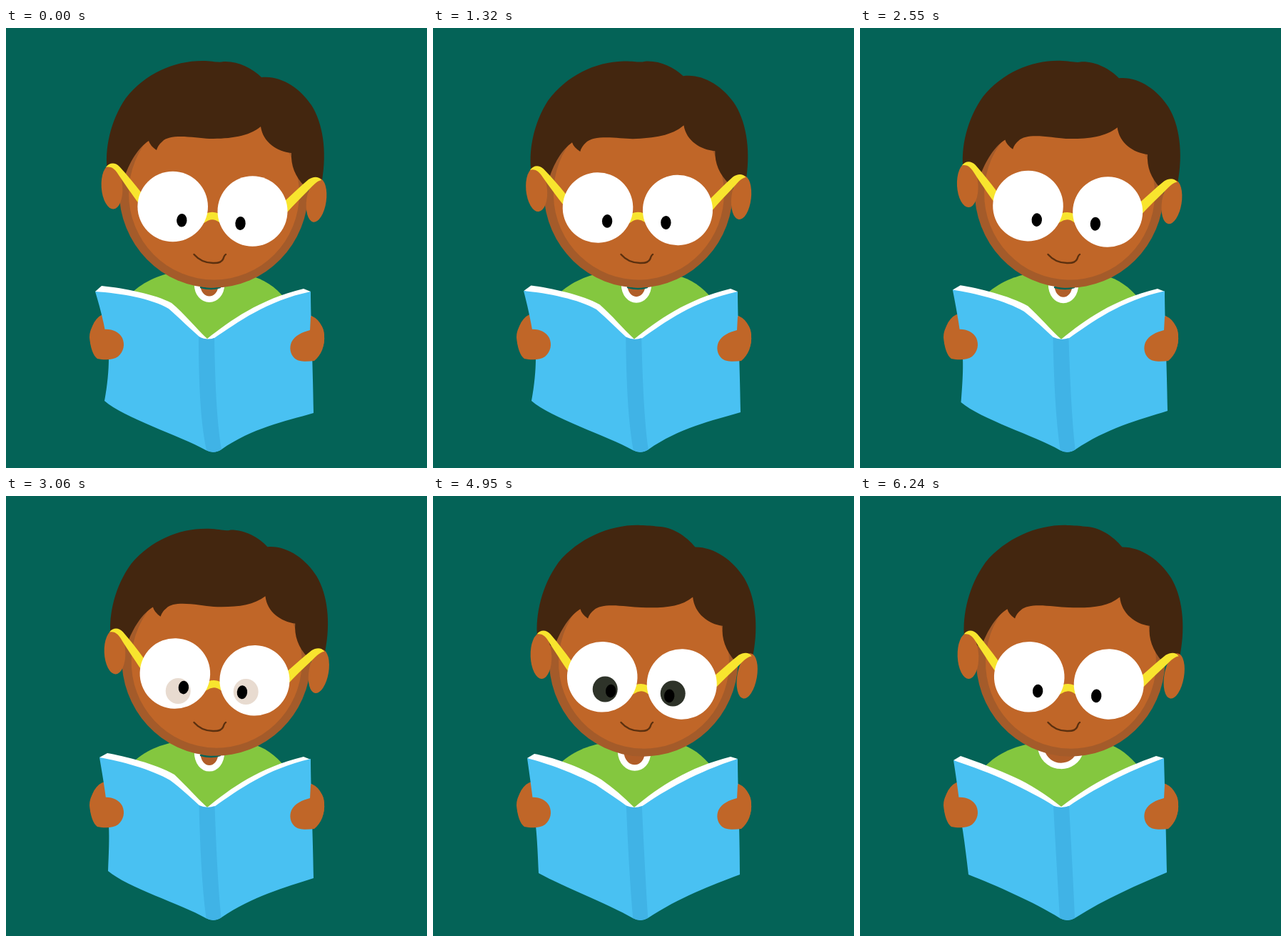
Recreate the animation shown at these times as an HTML page with a canvas. Size 590 px wide and 616 px high, loop 6.72 s.

```html
<!DOCTYPE html>
<html lang="en">
<head>
<meta charset="utf-8">
<title>Boy reading</title>
<style>
  html, body { margin: 0; width: 100%; height: 100%; overflow: hidden; background: #046357; }
  canvas { display: block; }
</style>
</head>
<body>
<canvas id="stage" width="590" height="616"></canvas>
<script>
const ctx = document.getElementById('stage').getContext('2d');
const LOOP = 6720, END = 6240, STEP = 30;
const GROUND = '#046357', SKIN = '#c06628', SHADE = '#a45b2a', HAIR = '#43260f',
  YELLOW = '#f8e52e', WHITE = '#fff', GREEN = '#84c73f', BLUE = '#49c1f2', SPINE = '#40b3e6';

// Each track is a list of [time, string]; the numbers in the strings are blended.
const tracks = {
  pages: [
    [0, 'M125 369 L134 361 C165 364 210 373 232 385 C250 400 266 420 282 435 C315 409 355 380 417 365 L427 369 L282 440 Z'],
    [3060, 'M131 366 L142 360 C165 364 210 375 236 390 C251 404 267 422 282 436 C315 409 355 380 417 365 L427 369 L282 440 Z'],
    [4950, 'M132 367 L142 361 C165 365 205 378 236 397 C252 408 267 421 282 436 C318 406 358 380 417 365 L427 368 L282 440 Z'],
    [END, 'M131 370 L141 364 C165 372 195 384 215 393 C238 403 262 419 282 435 C325 402 365 382 415 364 L426 367 L282 440 Z']
  ],
  cover: [
    [0, 'M125 369 C160 371 205 379 228 393 C243 406 259 422 273 434 Q282 438 292 434 C325 412 365 382 427 369 C427 410 430 465 431 539 C390 551 345 560 302 590 Q291 597 280 591 C245 571 165 546 138 522 C142 500 144 480 144 462 C142 430 133 395 125 369 Z'],
    [1320, 'M127 368 C160 371 205 380 229 394 C244 407 259 422 273 435 Q282 439 292 435 C325 412 365 382 427 369 C427 410 430 465 431 538 C390 550 345 560 302 590 Q291 597 280 591 C245 571 165 546 138 522 C142 500 144 480 144 462 C142 430 134 395 127 368 Z'],
    [3060, 'M131 366 C160 371 205 383 230 398 C245 409 260 423 273 435 Q282 439 292 435 C325 412 365 382 427 368 C427 410 430 465 431 535 C390 548 345 561 302 590 Q291 597 280 591 C245 571 170 548 143 525 C144 500 145 480 144 462 C142 430 136 395 131 366 Z'],
    [4950, 'M132 367 C160 374 200 389 228 404 C243 414 259 425 273 435 Q282 439 292 435 C325 412 370 386 427 368 C427 410 430 465 430 530 C390 545 345 562 301 591 Q291 597 280 591 C245 571 185 548 148 528 C147 505 146 480 144 462 C141 430 136 395 132 367 Z'],
    [END, 'M131 370 C158 379 185 389 206 399 C232 411 255 423 272 434 Q282 438 293 434 C325 412 375 385 426 367 C427 410 429 465 430 527 C390 544 345 563 301 591 Q291 597 280 591 C245 569 190 545 152 530 C149 505 146 480 143 462 C140 430 135 395 131 370 Z']
  ],
  spine: [
    [0, 'M270 432 Q282 438 292 434 C293 490 295 550 302 590 Q291 597 281 591 C272 550 270 490 270 432 Z'],
    [END, 'M271 434 Q282 438 293 434 C296 490 299 540 301 591 Q291 597 280 591 C277 540 274 490 271 434 Z']
  ],
  shirt: [
    [0, 'M170 377 C190 355 215 346 235 342 L342 347 C360 351 378 362 391 379 L282 440 Z'],
    [END, 'M170 384 C190 361 215 351 238 347 L346 347 C362 351 378 363 392 381 L282 440 Z']
  ],
  collar: [
    [0, 'M268 358 C268 387 302 387 302 358'],
    [3060, 'M268 358 C268 389 302 389 302 358'],
    [4200, 'M268 358 C268 389 302 389 302 358'],
    [4950, 'M263 358 C265 388 301 388 301 358'],
    [END, 'M254 356 C262 385 301 385 309 357']
  ],
  // Keyed by the nod, from 0 to 1.
  hair: [
    [0, 'M142 200 C138 170 146 130 168 98 C195 64 235 46 275 46 C290 46 297 49 305 47 C325 46 345 56 358 69 C385 66 412 84 428 108 C444 133 450 172 443 213 L419 222 C405 208 399 192 400 175 C380 173 360 160 357 138 C340 152 315 155 285 155 C265 154 230 147 219 159 Q213 164 211 171 Q202 165 200 158 C186 167 173 187 165 212 Z'],
    [1, 'M141 203 C137 170 145 130 167 97 C195 61 240 41 280 41 C290 41 297 41 305 42 C325 42 345 54 358 69 C385 68 412 86 428 110 C444 135 451 174 444 218 L420 228 C405 212 399 196 400 178 C380 176 360 162 357 139 C340 154 315 156 285 156 C265 156 230 150 219 162 Q213 167 211 174 Q202 168 200 161 C186 170 173 191 165 216 Z']
  ],
  iris: [
    [2880, 'rgb(255,255,255)'], [3060, 'rgb(232,219,208)'], [3900, 'rgb(68,68,68)'],
    [4950, 'rgb(46,51,41)'], [5300, 'rgb(46,51,41)'], [6200, 'rgb(255,255,255)']
  ]
};

const clamp = x => Math.min(1, Math.max(0, x));
const ramp = (t, from, to) => clamp((t - from) / (to - from));
const ease = (t, from, to) => (1 - Math.cos(Math.PI * ramp(t, from, to))) / 2;

function blend(track, t) {
  let i = 0;
  while (i < track.length - 2 && t >= track[i + 1][0]) i++;
  const [t0, a] = track[i], [t1, b] = track[i + 1];
  const k = ramp(t, t0, t1), goals = b.match(/[\d.]+/g);
  let n = 0;
  return a.replace(/[\d.]+/g, v => (+v + (goals[n++] - v) * k).toFixed(2));
}

function fill(path, color) {
  ctx.fillStyle = color;
  ctx.fill(new Path2D(path));
}

function stroke(path, color, width) {
  ctx.strokeStyle = color;
  ctx.lineWidth = width;
  ctx.stroke(new Path2D(path));
}

function oval(x, y, rx, ry, color, tilt = 0) {
  ctx.fillStyle = color;
  ctx.beginPath();
  ctx.ellipse(x, y, rx, ry, tilt, 0, 7);
  ctx.fill();
}

// Draws in the tilted space of the head, lowered by dy.
function onHead(angle, dy, paint) {
  ctx.save();
  ctx.translate(288, 355 + dy);
  ctx.rotate(angle * Math.PI / 180);
  ctx.translate(-288, -355);
  paint();
  ctx.restore();
}

function drawBody(t) {
  const collar = blend(tracks.collar, t);
  fill(blend(tracks.shirt, t), GREEN);
  fill(collar, '#b05d28');
  stroke(collar, WHITE, 8.5);
  if (t < 4500) stroke('M273 363 Q288 367 300 363', GROUND, 2.5);
}

function drawHead(t) {
  const nod = ease(t, 3000, 4500);
  const angle = -1.5 * ease(t, 0, 1200) + 3.25 * ease(t, 1200, 3200) + 0.15 * nod;

  onHead(angle, 0, () => {
    oval(291, 228 + nod, 132.5, 135.5, SHADE);
    oval(291.5, 232 + nod, 119.5, 120.5, SKIN);
    fill(blend(tracks.hair, nod), HAIR);
  });
  onHead(angle, 6 * nod, () => {
    oval(148.5 - 1.5 * nod, 222.5, 14.8, 31 + nod, SKIN, -0.07);
    oval(435 + 1.5 * nod, 241, 13.8, 31 + nod, SKIN, 0.14);
  });
  onHead(angle, 3.5 * nod, () =>
    fill('M140 195 C145 188 153 188 159 194 C170 206 180 218 190 231 L187 247 C176 232 166 218 158 206 C153 198 148 193 140 195 Z', YELLOW));
  onHead(angle, 6 * nod, () =>
    fill('M442 213 C438 207 430 208 424 212 C412 222 402 232 391 242 L394 258 C404 247 413 238 422 229 C430 221 435 214 442 213 Z', YELLOW));
  onHead(angle, 5 * nod, () => {
    stroke('M276 268 Q289 258 302 268', YELLOW, 10);
    oval(233.7, 250, 49.3, 49.3, WHITE);
    oval(345.5, 256.5, 49, 49.3, WHITE);
  });
  if (t > 2880 && t < 6200) {
    const color = blend(tracks.iris, t), shift = 2.5 * ramp(t, 3900, 4950);
    oval(241.2, 273 - shift, 17.5, 18, color);
    oval(336.2, 274 + shift, 17.5, 18, color);
  }
  onHead(angle, 5 * nod, () => {
    oval(246.3, 269.3, 7.2, 9.3, '#000', 0.06);
    oval(328.5, 273.5, 7.2, 9.5, '#000', 0.06);
  });
  stroke('M263.5 317 Q274 329 290 329 Q302 329.500 304.500 323 Q306 318 308 317', '#5b300f', 2.4);
}

function drawBook(t) {
  // Fingers behind the cover, thumbs in front.
  oval(139, 431, 21, 31, SKIN, 0.12);
  oval(424, 432, 22, 30, SKIN, -0.12);
  fill(blend(tracks.pages, t), WHITE);
  fill(blend(tracks.cover, t), BLUE);
  fill(blend(tracks.spine, t), SPINE);
  fill('M134 404 C125 411 117 420 117 433 C118 446 122 459 128 463 C138 465 150 465 157 460 C165 453 167 443 163 434 C158 425 148 421 137 422 Z', SKIN);
  fill('M427 404 C438 409 446 418 446 430 C447 445 442 458 432 466 C422 467 410 468 404 462 C398 456 397 447 400 440 C405 430 415 426 426 423 Z', SKIN);
}

function frame() {
  const now = performance.now() % LOOP;
  const t = Math.min(END, Math.floor(now / STEP) * STEP);
  ctx.fillStyle = GROUND;
  ctx.fillRect(0, 0, 590, 616);
  drawBody(t);
  drawHead(t);
  drawBook(t);
  requestAnimationFrame(frame);
}

ctx.lineCap = 'round';
frame();
</script>
</body>
</html>
```
